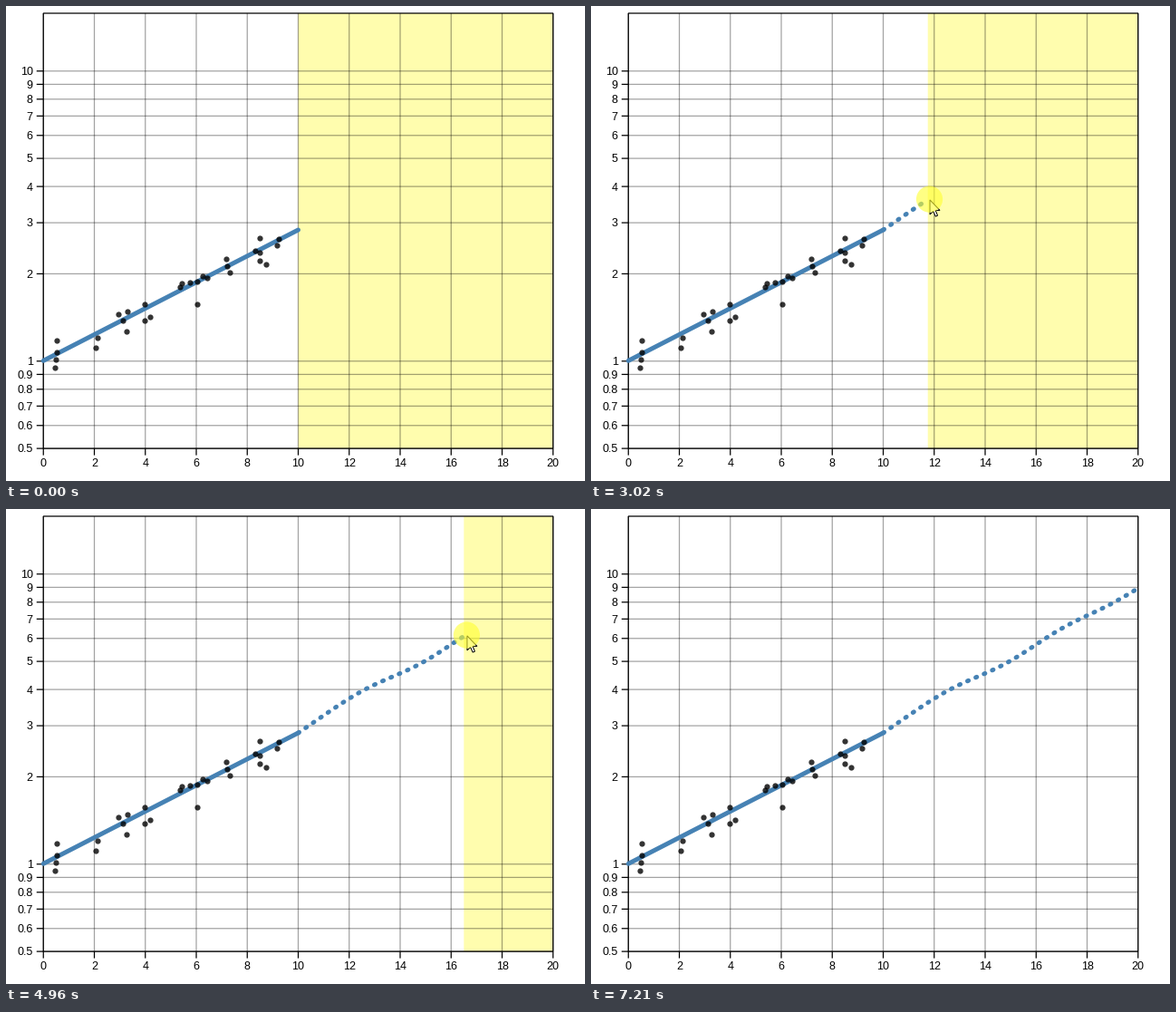
These frames come from a looping animation (639 by 524 pixels, 8.88 s). A matplotlib script:

```python
import matplotlib.pyplot as plt
import numpy as np
from matplotlib.animation import FuncAnimation
from matplotlib.collections import LineCollection
from matplotlib.patches import Circle, Polygon, Rectangle

W, H, DPI = 639, 524, 64
LOOP, INTERVAL = 8880, 30
PX = 72 / DPI  # points per pixel
LEFT, RIGHT, TOP, BOTTOM = 41.25, 603.75, 8, 488.1
BLUE, PALE = "steelblue", "#fffdae"
TREND_START, TREND_END = 391.3, 247  # heights of the solid line

# Moments in ms; the pointer moves once per TICK
ENTER, PRESS, RELEASE, LEAVE, TICK = 70, 1980, 6740, 7210, 77.6

# Where the pointer is while drawing: (ms, x)
DRAG = [(2100, 325.5), (2310, 336.5), (3650, 406.5), (4340, 466),
        (4960, 508.5), (5670, 570.5), (6440, 608)]

# Number of observations near each x value
GROUPS = {0.5: 4, 2.1: 2, 3.1: 4, 4.0: 3, 5.2: 2,
          5.8: 2, 6.2: 3, 7.1: 3, 8.5: 5, 9.3: 2}


def x_of(v):
    return LEFT + (RIGHT - LEFT) * v / 20


def y_of(v):
    return BOTTOM - 320 * np.log10(v / 0.5)


def curve(x):
    """Hand-drawn continuation: a straight climb with a few waves."""
    u = (x - x_of(10)) / (RIGHT - x_of(10))
    waves = (3.2, 1.6, 2.1, 0.95, -1.2)
    bump = sum(a * np.sin(n * np.pi * u) for n, a in enumerate(waves, 1))
    return TREND_END - 159.5 * u - bump


def make_points():
    rng = np.random.default_rng(4)
    v = np.repeat(list(GROUPS), list(GROUPS.values()))
    v = v + rng.uniform(-0.25, 0.25, v.size) * np.minimum(v / 3, 1)
    trend = TREND_START + (TREND_END - TREND_START) * v / 10
    return x_of(v), trend + np.clip(rng.normal(3, 12, v.size), -25, 25)


def make_dashes(period=9.94, length=1.25):
    """Split the curve into short round-capped dashes by arc length."""
    x = np.linspace(x_of(10), RIGHT, 400)
    y = curve(x)
    arc = np.append(0, np.cumsum(np.hypot(np.diff(x), np.diff(y))))
    starts = np.arange(0, arc[-1], period)

    def at(s):
        return np.column_stack([np.interp(s, arc, x), np.interp(s, arc, y)])

    return np.stack([at(starts), at(starts + length)], axis=1)


fig = plt.figure(figsize=(W / DPI, H / DPI), dpi=DPI, facecolor="white")
ax = fig.add_axes([0, 0, 1, 1])
ax.set_xlim(0, W)
ax.set_ylim(H, 0)
ax.axis("off")


def add_lines(segments, width, **style):
    lines = LineCollection(segments, linewidths=width * PX, snap=False, **style)
    return ax.add_collection(lines, autolim=False)


def label(x, y, value, align):
    ax.text(x, y, f"{value:g}", ha=align, va="baseline", color="black",
            family="Liberation Sans", fontsize=12.5 * PX)


x_ticks = range(0, 21, 2)
y_ticks = [k / 10 for k in range(5, 10)] + list(range(1, 11))

band = ax.add_patch(Rectangle((x_of(10), TOP), RIGHT - x_of(10), BOTTOM - TOP,
                              facecolor=PALE, linewidth=0, snap=False,
                              zorder=1))

grid = [[(x_of(v), TOP), (x_of(v), BOTTOM)] for v in x_ticks]
grid += [[(LEFT, y_of(v)), (RIGHT, y_of(v))] for v in y_ticks]
add_lines(grid, 1.25, colors="black", alpha=0.36, zorder=2)

ticks = [[(x_of(v), BOTTOM), (x_of(v), BOTTOM + 7.5)] for v in x_ticks]
ticks += [[(LEFT - 7.5, y_of(v)), (LEFT, y_of(v))] for v in y_ticks]
add_lines(ticks, 1.25, colors="black", zorder=3)
ax.add_patch(Rectangle((LEFT, TOP), RIGHT - LEFT, BOTTOM - TOP, fill=False,
                       edgecolor="black", linewidth=1.25 * PX, snap=False,
                       zorder=3))

for v in x_ticks:
    label(x_of(v), 508.4, v, "center")
for v in y_ticks:
    label(29.8, y_of(v) + 4.4, v, "right")

add_lines([[(LEFT, TREND_START), (x_of(10), TREND_END)]], 5, colors=BLUE,
          capstyle="round", zorder=4)
dashes = make_dashes()
trail = add_lines([], 5, colors=BLUE, capstyle="round", zorder=4)
ax.scatter(*make_points(), s=(6.25 * PX) ** 2, color="black", alpha=0.8,
           linewidths=0, zorder=5)

arrow = np.array([(0.5, 0.5), (0.5, 16.5), (4.2, 13), (6.7, 18.7),
                  (9, 17.7), (6.6, 12), (11.5, 12)])
pointer = ax.add_patch(Polygon(arrow, closed=True, facecolor="white",
                               edgecolor="black", linewidth=PX,
                               joinstyle="miter", zorder=6))
halo = ax.add_patch(Circle((0, 0), 14.6, facecolor="#ffff30", alpha=0.6,
                           linewidth=0, zorder=7))


def progress(t, start, end):
    return min(max((t - start) / (end - start), 0), 1)


def pointer_at(t):
    t = ENTER + TICK * np.floor((t - ENTER) / TICK)
    if t < PRESS:
        glide = 1 - (1 - progress(t, ENTER, 890)) ** 3
        drift = progress(t, 890, 1600)
        return 479 - 150 * glide - 4 * drift, 495 - 255 * glide + 6 * drift
    x = np.interp(t, *zip(*DRAG))
    out = progress(t, 6830, LEAVE) ** 2
    return x + 25 * out, curve(x) + 1 + 26 * out


def reached(t, x):
    """Right end of the drawn part, snapped to quarter units."""
    if t < PRESS:
        return 10
    if t >= RELEASE:
        return 20
    value = 20 * (x - LEFT) / (RIGHT - LEFT)
    return min(max(round(value * 4) / 4, 10), 20)


def draw(i):
    t = i * INTERVAL + 20
    x, y = pointer_at(t)
    end = reached(t, x)
    edge = x_of(end)

    band.set_x(edge)
    band.set_width(RIGHT - edge)
    trail.set_segments(dashes[dashes[:, 0, 0] < edge] if end > 10 else [])

    pointer.set_visible(ENTER <= t < LEAVE)
    pointer.set_xy(arrow + (x, y))
    halo.set_visible(PRESS <= t < RELEASE)
    halo.center = (x, y - 0.3)
    return band, trail, pointer, halo


anim = FuncAnimation(fig, draw, frames=LOOP // INTERVAL, interval=INTERVAL,
                     repeat=True, repeat_delay=0, blit=False)
plt.show()
```
